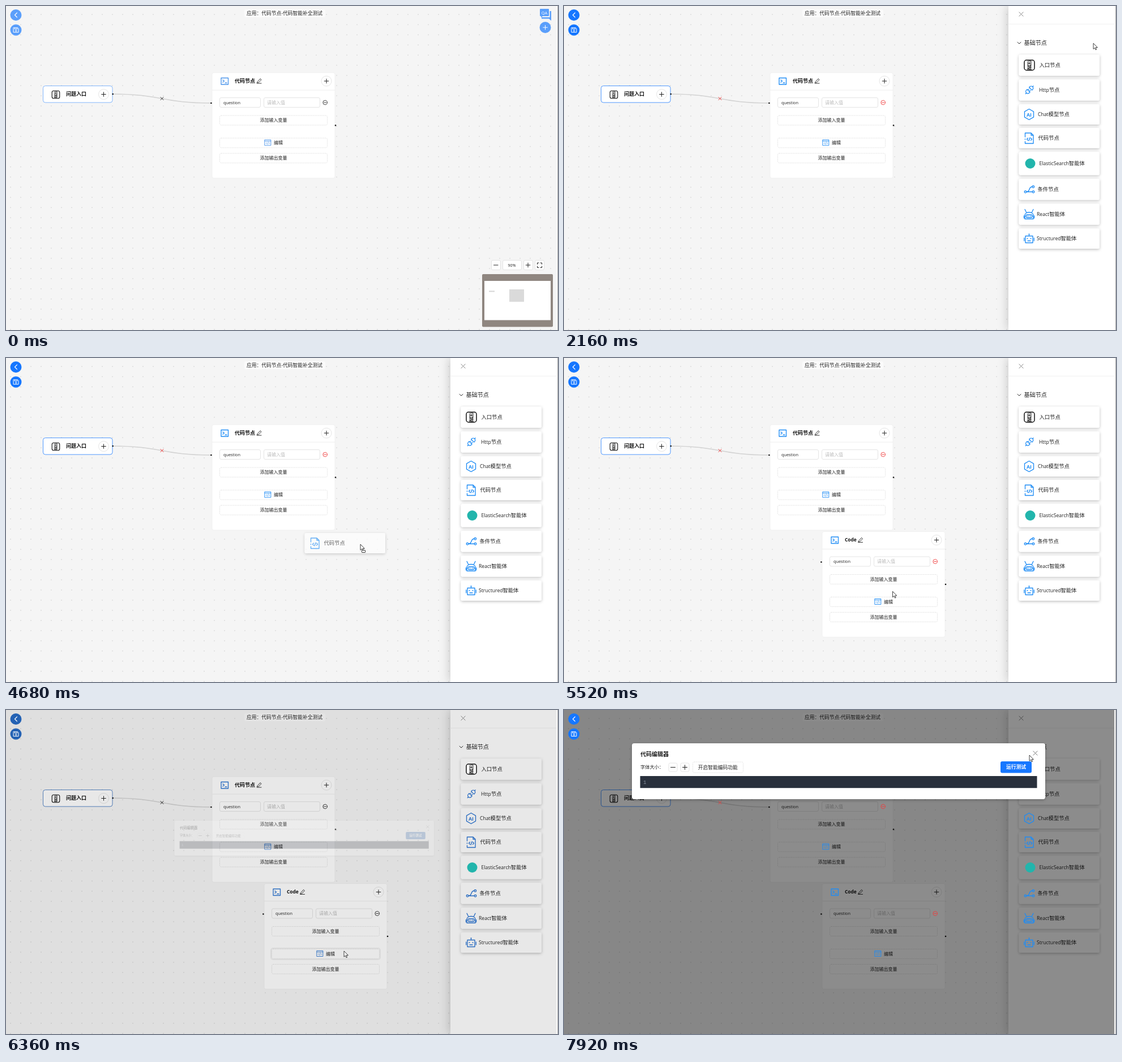
Animation, 975 px wide and 574 px high, one loop 8000 ms. Source, as an HTML page:

```html
<!DOCTYPE html>
<html lang="zh">
<head>
<meta charset="utf-8">
<style>
html, body { margin: 0; width: 100%; height: 100%; overflow: hidden; background: #f5f5f5; }
svg { display: block; width: 975px; height: 574px; --blue: #1677ff; --icon: #1e8cf5; --red: #f03a3a; --run: #1677ff; --map: #8c8c8c;
  font-family: "Open Sans", "Noto Sans CJK SC", "Noto Sans CJK", sans-serif; }
svg.pale { --blue: #5b9ffb; --icon: #4a94ea; --red: #333; --map: #8f8680; }
svg.early { --red: #a8423c; }
svg.opening { --blue: #2462b4; --icon: #2a6cc0; --red: #222; --run: #2060b4; }
.line { fill: none; stroke-linecap: round; stroke-linejoin: round; }
.icon { stroke: var(--icon); stroke-width: 1.35; }
.thin .icon { stroke-width: .9; }
.red { stroke: var(--red); }
.bold { font-weight: 700; }
.mid { text-anchor: middle; }
</style>
</head>
<body>
<svg id="stage" viewBox="0 0 975 574"></svg>
<script>
const stage = document.getElementById('stage');
const LOOP = 8000, STEP = 120;

// Drawing helpers
const text = (x, y, str, size, cls = '', fill = '#222') =>
  `<text x="${x}" y="${y + size * 0.37}" font-size="${size}" class="${cls}" fill="${fill}">${
    str.replace(/[A-Za-z]+/g, w => `<tspan font-size=".93em">${w}</tspan>`)}</text>`;
const rect = (x, y, w, h, r, fill = '#fff', extra = '') =>
  `<rect x="${x}" y="${y}" width="${w}" height="${h}" rx="${r}" fill="${fill}" ${extra}/>`;
const box = (x, y, w, h, dash = '') => rect(x + .5, y + .5, w - 1, h - 1, 2.5, '#fff', `stroke="#dedede" stroke-width=".8" stroke-dasharray="${dash}"`);
const circle = (x, y, r, fill, extra = '') => `<circle cx="${x}" cy="${y}" r="${r}" fill="${fill}" ${extra}/>`;
const line = (d, color = '#222', w = 1, cls = '') => `<path class="line ${cls}" d="${d}" ${color ? `stroke="${color}" stroke-width="${w}"` : ''}/>`;
const group = (x, y, body, extra = '', scale = 1) => `<g transform="translate(${x} ${y}) scale(${scale})" ${extra}>${body}</g>`;
const plus = (x, y, r, color, w = 1) => line(`M${x - r},${y}h${2 * r}M${x},${y - r}v${2 * r}`, color, w);
const cross = (x, y, r, color, w = 1, cls = '') =>
  line(`M${x - r},${y - r}l${2 * r},${2 * r}m0,${-2 * r}l${-2 * r},${2 * r}`, color, w, cls);
const iconPath = d => line(d, '', 1, 'icon');
const plusButton = (x, y) => circle(x, y, 9, '#fff', 'stroke="#ddd" stroke-width=".8"') + plus(x, y, 3.8, '#222');

const slashTag = 'M-2.5,-2l-2,2l2,2M2.5,-2l2,2l-2,2M.9,-2.8l-1.8,5.6';

const entryIcon = rect(-9, -9, 18, 18, 4, '#fff', 'stroke="#111" stroke-width="1.5"') +
  text(0, -3.7, '问', 8, 'mid bold', '#111') + text(0, 4.2, '题', 8, 'mid bold', '#111');
const icons = {
  entry: entryIcon,
  http: `<g transform="rotate(-45)">${iconPath('M-2,-3.5h-2a3.5,3.5 0 0 0 0,7h2zM3,-3.5h1.5a3.5,3.5 0 0 1 0,7h-1.5zM-2,-1.7h2.6M-2,1.7h2.6M-7.5,0h-2M8,0h2')}</g>`,
  chat: iconPath('M0,-9.5L8,-4.8V4.8L0,9.5L-8,4.8V-4.8Z') + text(0, 0, 'AI', 9.5, 'mid bold', 'var(--icon)'),
  code: iconPath('M-7,-2V-9H3.5L7.5,-5V9.5H-7V6M-7,1.5v1M3.5,-9v4h4') + group(.5, 2, iconPath(slashTag)),
  search: circle(0, 0, 9, '#22b5ac'),
  branch: iconPath('M-5.2,4.5C2,4.5 -2,-4.5 5,-4.5M-5.2,4.5H5.2') +
    [[-7, 4.5], [6.8, -4.5], [7, 4.5]].map(([x, y]) => circle(x, y, 1.8, 'none', 'class="icon"')).join(''),
  robot: iconPath('M-7.5,8.5V2C-7.5,-5 7.5,-5 7.5,2V8.5ZM-5,-3.5L-7.5,-8.5M5,-3.5L7.5,-8.5M-9,3v4M9,3v4M-3,1h6a2,2 0 0 1 0,5h-6a2,2 0 0 1 0,-5') +
    circle(-2, 3.5, .9, 'var(--icon)') + circle(2, 3.5, .9, 'var(--icon)'),
  bot: iconPath('M-6.5,-4.5h13v12h-13zM0,-4.5V-7.5M-8.7,-1v5M8.7,-1v5M-2.5,4h5') +
    circle(0, -7.7, 1, 'var(--icon)') + circle(-3, 0, 1, 'var(--icon)') + circle(3, 0, 1, 'var(--icon)'),
};

// Each item: top, height, icon x, text x, icon, label
const items = [
  [86, 37.5, 822, 839.5, 'entry', '入口节点'],
  [130, 37.5, 822, 839, 'http', 'Http节点'],
  [174, 36, 821.5, 837, 'chat', 'Chat模型节点'],
  [216, 36, 821.5, 837.5, 'code', '代码节点'],
  [258.5, 41, 823.5, 839.5, 'search', 'ElasticSearch智能体'],
  [306, 37.5, 822, 836.5, 'branch', '条件节点'],
  [350, 37.5, 821.5, 835, 'robot', 'React智能体'],
  [394, 36, 821.5, 835, 'bot', 'Structured智能体'],
];
const itemBody = ([y, h, , tx, , label]) =>
  rect(803.5, y, 142.5, h, 3, '#fff', 'filter="url(#itemShadow)"') + text(tx, y + h / 2, label, 9.3);
const itemIcon = ([y, h, ix, , icon]) => group(ix, y + h / 2, icons[icon]);

const card = (name, pencilX) =>
  rect(0, 0, 217, 187, 3, '#fff', 'stroke="#eee" stroke-width=".8"') + line('M0,31H217', '#eee') +
  text(40, 14.5, name, 9, 'bold', '#111') +
  group(pencilX, 14, line('M-3,2.5L2,-3.2L4,-1.4L-1,3.7L-3.3,4ZM-4,5H4', '#222', .9)) +
  plusButton(202, 15) +
  box(13, 44, 73, 18) + text(20, 53, 'question', 7.9) + box(91, 44, 100, 18) + text(97, 53, '请输入值', 8, '', '#bbb') +
  [75.5, 115.5, 142.5].map(y => box(13, y, 191, 18, '2 1')).join('') +
  text(108.5, 84.5, '添加输入变量', 8, 'mid') + text(108.5, 151.5, '添加输出变量', 8, 'mid') + text(109, 124.5, '编辑', 8) +
  circle(-1.6, 54, 1.3, '#111') + circle(218, 93.5, 1.3, '#111');
const cardAccents = iconPath('M16,9.5h12.5v11.5H16ZM19,13l2.5,2l-2.5,2M23,18.2h3') +
  `<g class="line red" stroke-width=".9"><circle cx="199.6" cy="53" r="3.8"/><path d="M197.6,53h4"/></g>` +
  group(98.5, 124, iconPath('M-5.3,-5h10.6v10h-10.6zM-5.3,-2.7h10.6') + group(0, 1, iconPath(slashTag), '', .75), 'class="thin"');

const canvas = rect(0, 0, 972, 574, 0, 'url(#dots)') +
  rect(421, 6, 143, 14, 3, '#fbfbfb') + text(425, 13, '应用：代码节点-代码智能补全测试', 8.75) +
  line('M188,156C275,156 275,172 362,172', '#d2d2d2', 1.5) +
  rect(65.5, 141.5, 122.5, 29.5, 4, '#fff', 'stroke="var(--blue)" stroke-opacity=".75"') +
  group(88, 157, entryIcon, '', .75) + text(106, 156, '问题入口', 9, 'bold', '#111') + plusButton(172.5, 156.5) +
  circle(188.7, 156, 1.3, '#111');

const corner = `<path d="M960.5,9h2.5v17l-4,-3.5h-13v-2.5h14.5z" fill="var(--blue)"/>` +
  `<path d="M944,5h14q1,0 1,1v11q0,1 -1,1h-10l-3,2.5v-2.5h-1q-1,0 -1,-1v-11q0,-1 1,-1z" fill="var(--blue)"/>` +
  text(951, 11.7, 'QA', 8, 'mid', '#fff') + circle(952.5, 38, 10, 'var(--blue)') + plus(952.5, 38, 3.8, '#fff') +
  [[857, 17], [877, 34], [914, 17], [934, 17]].map(([x, w]) => box(x, 450, w, 18)).join('') +
  line('M861.5,459h7.5') + text(893.5, 459, '90%', 7, 'mid') + plus(922, 459, 3.8, '#222') +
  line('M938.5,457.5v-2.5h2.5M944,455h2.5v2.5M946.5,461v2.5h-2.5M941,463.5h-2.5v-2.5') +
  rect(841, 475, 125, 93.5, 2, 'var(--map)') + rect(845, 487, 117, 69.5, 0) +
  rect(853, 504.5, 10, 2, 0, '#d5d5d5') + rect(889, 502, 26, 22, 0, '#dadada');

const drawer = rect(785, 0, 190, 574, 0, '#fff', 'filter="url(#drawerShadow)"') + line('M785,32H975', '#f0f0f0') +
  cross(807.5, 14.5, 3.6, '#888') + line('M801,64l3,3l3,-3', '#333') +
  text(812.5, 65.5, '基础节点', 10.1) + items.map(itemBody).join('');

const leftButtons = circle(17.5, 16, 10, 'var(--blue)') + circle(17.5, 42.5, 10, 'var(--blue)') +
  line('M19.5,12l-4,4l4,4', '#fff', 1.1) +
  line('M13.5,38.5h7l1.5,1.5v6.5h-8.5zM15.5,38.5v2.5h4v-2.5', '#fff') + circle(17.7, 44, 1.1, 'none', 'stroke="#fff"');

const modal = rect(120, 59, 730, 99, 4, '#fff', 'filter="url(#itemShadow)"') +
  text(135, 78.5, '代码编辑器', 10, 'bold') + text(135, 101, '字体大小：', 8.2) +
  box(184.5, 93.5, 16, 16) + box(205.5, 93.5, 16, 16) + line('M188.5,101.5h8') + plus(213.5, 101.5, 4, '#222') +
  box(227, 91.5, 90, 20, '2 1') + text(271.8, 101.5, '开启智能编码功能', 8.75, 'mid') +
  rect(771, 91, 55, 20.5, 3, 'var(--run)') + text(798.5, 101.2, '运行测试', 8.75, 'mid bold', '#fff') +
  cross(832.5, 76.5, 3.6, '#777') + rect(134.5, 117, 701, 21.2, 0, '#29303c') +
  `<text x="140" y="131" font-size="9" font-family="Liberation Mono, monospace" fill="#8a93a0">1</text>`;

const arrow = '<path d="M0,0V10.3L2.4,8.1L4,11.7L5.6,11L4.1,7.5H7.3Z" fill="#fff" stroke="#111" stroke-width=".8"/>';
const hand = '<path d="M-1,1q0,-1.3 1.1,-1.3t1.1,1.3v4.5l1.8,.2l2,.6l1.8,.8q.6,.5 .4,2l-1,3.6v1.3h-5.8v-1.2l-2.7,-3.7q-1.2,-1.7 -.7,-2.2q.9,-.5 2,1z" fill="#fff" stroke="#111" stroke-width=".9"/>';
const dragCursor = arrow + rect(2.5, 10.5, 6, 4, .5, '#fff', 'stroke="#111" stroke-width=".8"');

stage.innerHTML = `<defs>
  <pattern id="dots" width="18" height="18" x="-1" y="6" patternUnits="userSpaceOnUse">${circle(9, 9, .7, '#c2c2c2')}</pattern>
  <filter id="itemShadow" x="-20%" y="-40%" width="140%" height="200%"><feDropShadow dx="0" dy="1.5" stdDeviation="2.5" flood-opacity=".26"/></filter>
  <filter id="drawerShadow" x="-30%" width="160%"><feDropShadow dx="-3" dy="0" stdDeviation="8" flood-opacity=".17"/></filter>
  <clipPath id="page">${rect(0, 0, 972, 574, 0)}</clipPath>
</defs>
${rect(0, 0, 975, 574, 0, '#f5f5f5')}
<g clip-path="url(#page)">
  ${canvas}${group(364, 118, card('代码节点', 83))}
  <g id="newCard">${group(456, 307.5, card('Code', 67.5))}
    <g id="hover">${rect(469.5, 423.5, 190, 17, 2.5, '#fff', 'stroke="#a9c4f2" stroke-width=".8" stroke-dasharray="2 1"')}${text(565, 432, '编辑', 8, '', '#3f7fe0')}</g>
    <g id="wave">${rect(468, 422, 193, 20, 4, 'none', 'stroke="#f0f0f0" stroke-width="2"')}</g>
  </g>
  ${corner}
  <g class="drawer">${drawer}</g>
  <rect id="mask" width="972" height="574"/>
  ${leftButtons}${cross(275.5, 164, 2.5, '', 1, 'red')}
  ${group(364, 118, cardAccents)}${group(456, 307.5, cardAccents, 'id="newAccents"')}
  <g class="drawer">${items.map(itemIcon).join('')}</g>
  <g id="ghost" opacity=".68">${itemBody(items[3])}${itemIcon(items[3])}</g>
  <g id="modal">${modal}</g>
</g>
${rect(972, 0, 3, 574, 0, '#fafafa')}${line('M974.5,0V574', '#999', .8)}
<g id="cursor"><g id="arrow">${arrow}</g><g id="hand">${hand}</g><g id="drag">${dragCursor}</g></g>`;

const get = id => document.getElementById(id);
const show = (id, on) => get(id).style.display = on ? '' : 'none';
const clamp = v => Math.max(0, Math.min(1, v));

// Pointer path: time, x, y
const path = [[720, 930, 120], [1200, 951, 38], [1800, 951, 38], [3240, 887, 150], [3480, 902, 236], [3720, 902, 236],
  [4680, 626, 330], [5040, 564, 400], [5160, 564, 400], [5880, 597, 427], [6720, 597, 427], [7800, 822, 80], [8000, 822, 80]];
function pointer(t) {
  const i = Math.max(1, path.findIndex(p => p[0] >= t));
  const [a, b] = [path[i - 1], path[i]], p = clamp((t - a[0]) / (b[0] - a[0]));
  return [a[1] + (b[1] - a[1]) * p, a[2] + (b[2] - a[2]) * p];
}

function render(t) {
  const opening = t >= 6360 && t < 6720;
  stage.setAttribute('class', t < 480 ? 'pale' : t < 1800 ? 'early' : opening ? 'opening' : '');

  const slide = 1 - (1 - clamp((t - 1500) / 300)) ** 2;
  for (const d of document.querySelectorAll('.drawer')) {
    d.setAttribute('transform', `translate(${190 * (1 - slide)} 0)`);
    d.setAttribute('opacity', slide && .7 + .3 * slide);
  }

  const [x, y] = pointer(t), dragging = t >= 3720 && t < 5160;
  const pointing = t >= 1200 && t < 1920 || t >= 5880 && t < 6360;
  get('cursor').setAttribute('transform', `translate(${x} ${y})`);
  show('cursor', t >= 720);
  show('hand', pointing);
  show('drag', dragging);
  show('arrow', !pointing && !dragging);
  get('ghost').setAttribute('transform', `translate(${x - 902} ${y - 236})`);
  show('ghost', dragging);

  for (const id of ['newCard', 'newAccents']) show(id, t >= 5160);
  show('hover', t >= 5880 && t < 6360);
  show('wave', t >= 6360 && t < 6600);

  // The dialog grows out of the point that was clicked
  const zoom = clamp((t - 6329) / 200), fade = clamp(zoom * 1.3);
  const scale = .2 + .8 * Math.sqrt(1 - (1 - zoom) ** 2);
  get('mask').setAttribute('opacity', .45 * fade);
  get('modal').setAttribute('opacity', fade);
  get('modal').setAttribute('transform', `translate(597 427) scale(${scale}) translate(-597 -427)`);
}

const start = performance.now();
function tick() {
  const t = (performance.now() - start) % LOOP;
  render(Math.floor(t / STEP) * STEP);
  requestAnimationFrame(tick);
}
tick();
</script>
</body>
</html>
```
